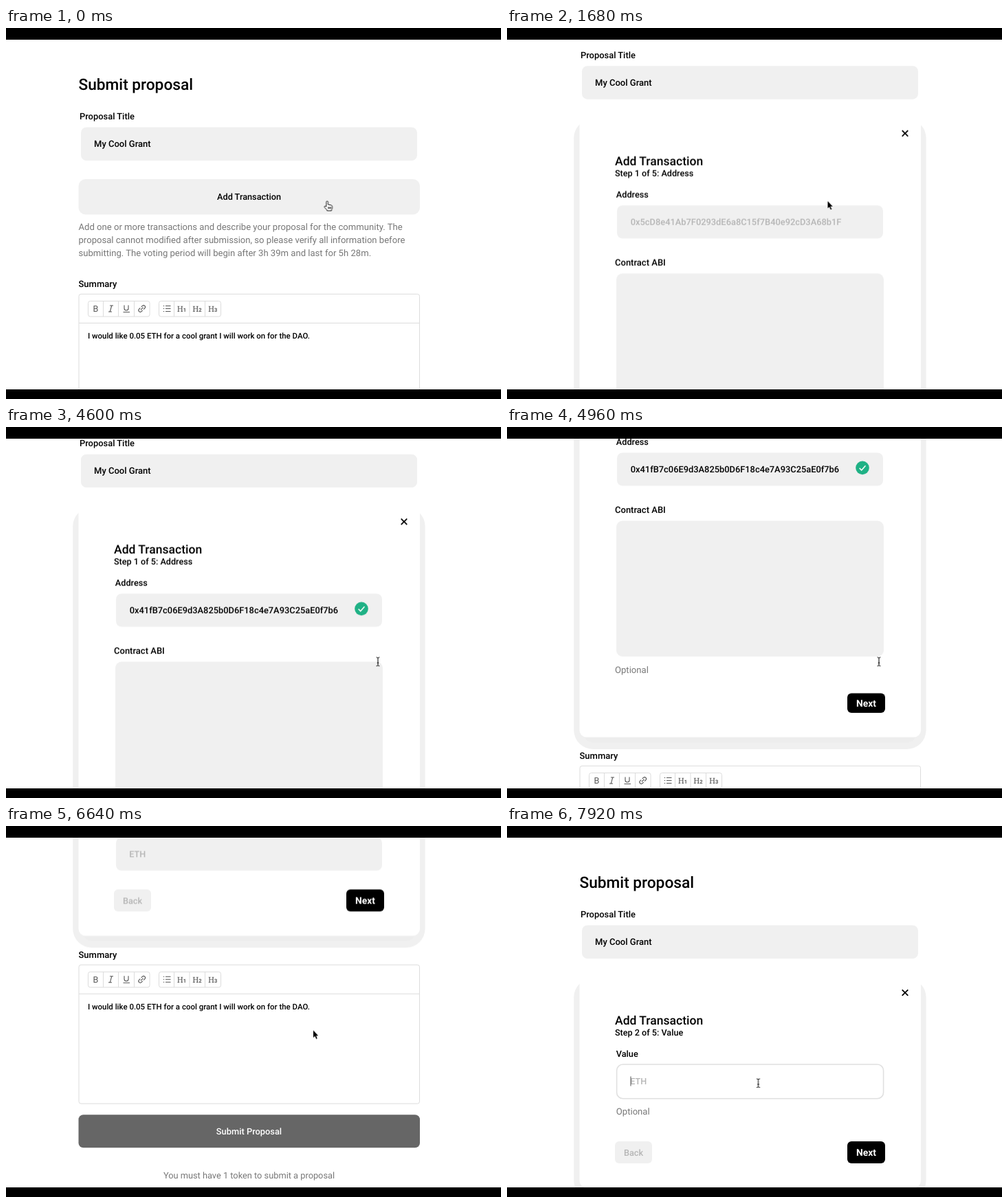
An HTML page for the animation above (8 s loop, 720x540 px).

```html
<!DOCTYPE html>
<html lang="en">
<head>
<meta charset="utf-8">
<title>Submit proposal</title>
<style>
@property --h { syntax: "<length>"; inherits: true; initial-value: 51.5px; }
html, body { margin: 0; width: 100%; height: 100%; overflow: hidden; background: #fff; }
svg { display: block; width: 100vw; height: 100vh; }
text { font: 450 13px Roboto, sans-serif; fill: #000; text-rendering: geometricPrecision; }
.mid { text-anchor: middle; }
.hint { font-size: 13.1px; font-weight: 400; fill: #777; }
.ghost { fill: #b5b5b5; }
.hash { font-size: 12.85px; }
.field { fill: #f0f0f0; }
.focus { fill: #fff; stroke: #e0e0e0; stroke-width: 1.6; }
.caret { fill: #555; }
.line { fill: none; stroke: #dcdcdc; }
.icon { fill: none; stroke: #555; stroke-width: 1.1; }
.icons text { fill: #555; font-size: 12.5px; font-weight: 400; }
.icons .h { font: 11.5px "Noto Serif", serif; }
.icons .n { font-size: 7.5px; font-weight: 700; }

/* one loop is 8 s, so 1% is 80 ms */
.a { animation: 8s linear infinite; }
.cut { animation-timing-function: step-end; }

#page { animation-name: scroll; }
@keyframes scroll {
  0% { transform: translateY(0); }
  15.75% { transform: translateY(0); animation-timing-function: cubic-bezier(.25,.6,.4,1); }
  26% { transform: translateY(-103.5px); }
  57.125% { transform: translateY(-103.5px); animation-timing-function: cubic-bezier(.35,0,.3,1); }
  66.5%, 73.2% { transform: translateY(-375.5px); animation-timing-function: ease-out; }
  74.5% { transform: translateY(-331.3px); }
  82.75% { transform: translateY(-331.3px); animation-timing-function: cubic-bezier(.35,0,.3,1); }
  93%, 100% { transform: translateY(0); }
}
#intro { animation-name: intro; }
@keyframes intro { 0%, 7% { opacity: 1; } 9%, 100% { opacity: 0; } }

#modal { animation-name: modal; }
@keyframes modal {
  0%, 7% { opacity: 0; --h: 51.5px; animation-timing-function: ease-out; }
  8% { opacity: 1; }
  13%, 26.5% { --h: 541.5px; animation-timing-function: ease; }
  31%, 51% { --h: 577px; animation-timing-function: ease; }
  55.5%, 70.5% { --h: 541.5px; animation-timing-function: ease-out; }
  74.5%, 93.75% { --h: 270.5px; animation-timing-function: ease; }
  98.5%, 100% { opacity: 1; --h: 306.5px; }
}
.shade { height: calc(var(--h) + 16px); }
.edge { height: calc(var(--h) + 7px); }
.sheet { height: var(--h); }

#summary { animation-name: summary; }
@keyframes summary {
  0%, 7% { transform: translateY(372.5px); animation-timing-function: ease-out; }
  13%, 26.5% { transform: translateY(788.5px); animation-timing-function: ease; }
  31%, 51% { transform: translateY(824px); animation-timing-function: ease; }
  55.5%, 70.5% { transform: translateY(788.5px); animation-timing-function: ease-out; }
  74.5%, 93.75% { transform: translateY(518px); animation-timing-function: ease; }
  98.5%, 100% { transform: translateY(554px); }
}
#head { animation-name: head; }
@keyframes head { 0%, 8% { opacity: 0; } 12%, 100% { opacity: 1; } }
#one { animation-name: one; }
@keyframes one { 0%, 8% { opacity: 0; } 12%, 70.49% { opacity: 1; } 70.5%, 100% { opacity: 0; } }
#two { animation-name: two; }
@keyframes two { 0%, 70.5% { opacity: 0; } 73%, 100% { opacity: 1; } }

#focus1 { animation-name: focus1; }
@keyframes focus1 { 0%, 26.5% { opacity: 0; } 28%, 51% { opacity: 1; } 52.5%, 100% { opacity: 0; } }
#hint1 { animation-name: hint1; }
@keyframes hint1 { 0%, 27.5% { opacity: 0; } 31%, 51% { opacity: 1; } 52.5%, 100% { opacity: 0; } }
#abi { animation-name: abi; }
@keyframes abi {
  0%, 26.5% { transform: translateY(0); animation-timing-function: ease; }
  31%, 51% { transform: translateY(35.5px); animation-timing-function: ease; }
  55.5%, 100% { transform: translateY(0); }
}
#focus2 { animation-name: focus2; }
@keyframes focus2 { 0%, 93.75% { opacity: 0; } 95.25%, 100% { opacity: 1; } }
#hint2 { animation-name: hint2; }
@keyframes hint2 { 0%, 94.75% { opacity: 0; } 98.5%, 100% { opacity: 1; } }
#nav { animation-name: nav; }
@keyframes nav {
  0%, 93.75% { transform: translateY(0); animation-timing-function: ease; }
  98.5%, 100% { transform: translateY(36px); }
}
#empty { animation-name: empty; }
@keyframes empty { 0% { opacity: 1; } 40%, 100% { opacity: 0; } }
#pasted { animation-name: pasted; }
@keyframes pasted { 0% { opacity: 0; } 40%, 100% { opacity: 1; } }
#check { animation-name: check; }
@keyframes check { 0%, 40% { opacity: 0; } 42.5%, 100% { opacity: 1; } }
#caret1 { animation-name: caret1; }
@keyframes caret1 { 0% { opacity: 0; } 27% { opacity: 1; } 33.5%, 100% { opacity: 0; } }
#caret2 { animation-name: caret2; }
@keyframes caret2 { 0% { opacity: 0; } 40% { opacity: 1; } 46.5%, 100% { opacity: 0; } }
#caret3 { animation-name: caret3; }
@keyframes caret3 { 0% { opacity: 0; } 94%, 100% { opacity: 1; } }
#next { animation-name: next; }
@keyframes next { 0%, 65.5% { fill: #000; } 66.5%, 100% { fill: #707070; } }

#pointer { animation-name: pointer; }
@keyframes pointer {
  0%, 23.5% { transform: translate(466.5px, 252px); animation-timing-function: ease-in-out; }
  26.5%, 46% { transform: translate(362.5px, 255px); animation-timing-function: ease-in-out; }
  51%, 65% { transform: translate(541px, 341.3px); animation-timing-function: ease-in-out; }
  66.5%, 74.5% { transform: translate(534px, 339.5px); animation-timing-function: ease-in-out; }
  79%, 89.5% { transform: translate(447px, 297.5px); animation-timing-function: ease-in-out; }
  93%, 100% { transform: translate(365.5px, 374px); }
}
#hand { animation-name: hand; }
@keyframes hand { 0% { opacity: 1; } 7.5% { opacity: 0; } 66.5% { opacity: 1; } 71.25%, 100% { opacity: 0; } }
#beam { animation-name: beam; }
@keyframes beam {
  0% { opacity: 0; } 23.75% { opacity: 1; } 48.25% { opacity: 0; } 53.5% { opacity: 1; }
  65.5% { opacity: 0; } 92.25%, 100% { opacity: 1; }
}
#arrow { animation-name: arrow; }
@keyframes arrow {
  0% { opacity: 0; } 7.5% { opacity: 1; } 23.75% { opacity: 0; } 48.25% { opacity: 1; }
  53.5% { opacity: 0; } 65.5% { opacity: 1; } 66.5% { opacity: 0; } 71.25% { opacity: 1; }
  92.25%, 100% { opacity: 0; }
}
</style>
</head>
<body>
<svg viewBox="0 0 720 540">
  <rect width="720" height="540" fill="#fff"/>

  <g id="page" class="a">
    <text x="105.5" y="90" style="font-size:22.7px;font-weight:500">Submit proposal</text>
    <text x="107" y="133.2" style="font-size:12.9px">Proposal Title</text>
    <rect class="field" x="109" y="144.5" width="489" height="48.5" rx="8"/>
    <text x="128" y="173">My Cool Grant</text>

    <g id="intro" class="a">
      <rect class="field" x="105.5" y="220" width="496.5" height="51.5" rx="10"/>
      <text class="mid" x="353.5" y="250" style="font-size:12.7px">Add Transaction</text>
      <text class="hint" x="105.5" y="293.7">Add one or more transactions and describe your proposal for the community. The</text>
      <text class="hint" x="105.5" y="312.9">proposal cannot modified after submission, so please verify all information before</text>
      <text class="hint" x="105.5" y="332.1">submitting. The voting period will begin after 3h 39m and last for 5h 28m.</text>
    </g>

    <g id="summary" class="a">
      <text x="105.5" y="4.8">Summary</text>
      <rect class="line" x="106" y="14.8" width="495.5" height="202" rx="3" style="fill:#fff"/>
      <path class="line" d="M106 57H601.5"/>
      <g class="icons">
        <rect class="line" x="119.5" y="25" width="89.5" height="22.5" rx="3"/>
        <rect class="line" x="222.5" y="25" width="90" height="22.5" rx="3"/>
        <path class="line" d="M141.5 25v22.5M163.5 25v22.5M186.5 25v22.5M244.5 25v22.5M267 25v22.5M289.5 25v22.5"/>
        <text class="mid" x="130.3" y="40.7">B</text>
        <path class="icon" d="M151 31.5h5M149 40.5h5M153.7 31.5l-2.4 9M172 31v4.5a3 3 0 0 0 6 0V31M170.5 41h9.5"/>
        <g transform="translate(197.7 36) rotate(-45)">
          <path class="icon" d="M-1-2.4H-3.4a2.4 2.4 0 0 0 0 4.8H-1M1-2.4H3.4a2.4 2.4 0 0 1 0 4.8H1M-2.5 0h5"/>
        </g>
        <path class="icon" d="M232 32h7.5M232 36h7.5M232 40h7.5M228.8 32h1.4M228.8 36h1.4M228.8 40h1.4"/>
        <text class="h" x="248.8" y="40.2">H</text><text class="n" x="257.8" y="40.4">1</text>
        <text class="h" x="271.3" y="40.2">H</text><text class="n" x="280.3" y="40.4">2</text>
        <text class="h" x="294.1" y="40.2">H</text><text class="n" x="303.1" y="40.4">3</text>
      </g>
      <text x="119" y="79.8" style="font-size:11.45px">I would like 0.05 ETH for a cool grant I will work on for the DAO.</text>
      <rect x="105.5" y="233" width="496.5" height="48" rx="7" fill="#666"/>
      <text class="mid" x="353.5" y="261.3" style="font-size:12.85px;fill:#fff">Submit Proposal</text>
      <text class="mid hint" x="353.5" y="325.5" style="font-size:12.8px">You must have 1 token to submit a proposal</text>
    </g>

    <g id="modal" class="a">
      <rect class="shade" x="97.2" y="221.5" width="512.4" rx="28" fill="#f0f0f0"/>
      <rect class="edge" x="113" y="220" width="481" rx="10" fill="#ededed"/>
      <rect class="sheet" x="105.5" y="220" width="496.5" rx="10" fill="#fff"/>

      <g id="head" class="a">
        <path d="M574.7 238.3l8.6 8.6m0-8.6l-8.6 8.6" stroke="#000" stroke-width="1.8"/>
        <text x="157" y="288.7" style="font-size:17.5px">Add Transaction</text>
        <rect class="field" x="160" y="347.5" width="387" height="48" rx="8"/>
      </g>

      <g id="one" class="a">
        <text x="157" y="304.8" style="font-size:12.6px">Step 1 of 5: Address</text>
        <text x="158.8" y="336.2" style="font-size:12.7px">Address</text>
        <rect id="focus1" class="focus a" x="159.6" y="347" width="388" height="49.4" rx="9"/>
        <text id="empty" class="ghost hash a cut" x="179.8" y="376">0x5cD8e41Ab7F0293dE6a8C15f7B40e92cD3A68b1F</text>
        <text id="pasted" class="hash a cut" x="179.8" y="376">0x41fB7c06E9d3A825b0D6F18c4e7A93C25aE0f7b6</text>
        <g id="check" class="a">
          <circle cx="517" cy="369.4" r="9.8" fill="#1fb185"/>
          <path d="M512.6 369.7l3.1 3.1 5.8-6.5" fill="none" stroke="#fff" stroke-width="1.5"/>
        </g>
        <rect id="caret1" class="caret a cut" x="179.5" y="364.5" width="1" height="14"/>
        <rect id="caret2" class="caret a cut" x="482.5" y="364.5" width="1" height="14"/>
        <text id="hint1" class="hint a" x="158.8" y="419.7">Callee or Recipient</text>
        <g id="abi" class="a">
          <text x="157" y="435.4">Contract ABI</text>
          <rect class="field" x="159" y="446.5" width="389" height="197.5" rx="9"/>
          <text class="hint" x="157" y="668.2">Optional</text>
          <rect id="next" class="a" x="495" y="697.5" width="55" height="28.5" rx="6"/>
          <text class="mid" x="522.5" y="716.6" style="font-size:13.8px;font-weight:600;fill:#fff">Next</text>
        </g>
      </g>

      <g id="two" class="a">
        <text x="157" y="304.8" style="font-size:12.6px">Step 2 of 5: Value</text>
        <text x="158.8" y="336.2" style="font-size:12.7px">Value</text>
        <rect id="focus2" class="focus a" x="159.6" y="347" width="388" height="49.8" rx="9"/>
        <text class="ghost" x="179.3" y="376" style="font-size:12.7px">ETH</text>
        <rect id="caret3" class="caret a cut" x="179.5" y="364.5" width="1" height="14"/>
        <text id="hint2" class="hint a" x="158.8" y="420">Optional</text>
        <g id="nav" class="a">
          <rect class="field" x="157" y="423" width="54" height="32" rx="6"/>
          <text class="mid ghost" x="184" y="443.6" style="font-size:12.7px">Back</text>
          <rect x="495" y="423" width="55" height="32" rx="6"/>
          <text class="mid" x="522.5" y="443.9" style="font-size:13.8px;font-weight:600;fill:#fff">Next</text>
        </g>
      </g>
    </g>
  </g>

  <g id="pointer" class="a">
    <path id="arrow" class="a cut" d="M0 0V10.5L2.4 8.3 4.2 12.4 5.8 11.7 4 7.7H7.2z" stroke="#fff" stroke-width=".8" paint-order="stroke"/>
    <g id="hand" class="a cut" transform="translate(1 0)" stroke="#000" stroke-width=".9">
      <path d="M-1.6 7.5V1.3a1.3 1.3 0 0 1 2.6 0V5l4.4.8q1.6.4 1.6 2V10q0 1.5-1 2.5V14H-.6V13L-4 9.2q-.9-1.3.2-2 1-.4 2.2.9z" fill="#fff"/>
      <path d="M1.4 8.3v3M3.1 8.3v3M4.8 8.3v3"/>
    </g>
    <g id="beam" class="a cut" fill="none">
      <path d="M0-5V5.5" stroke="#fff" stroke-width="2.4"/>
      <path d="M-2.4-6Q-.5-6 0-5 .5-6 2.4-6M0-5V5.5M-2.4 6.5Q-.5 6.5 0 5.5 .5 6.5 2.4 6.5M-1.3 2h2.6" stroke="#000"/>
    </g>
  </g>

  <path d="M0 0H720V17H0zM0 526H720V540H0z"/>
</svg>
</body>
</html>
```
